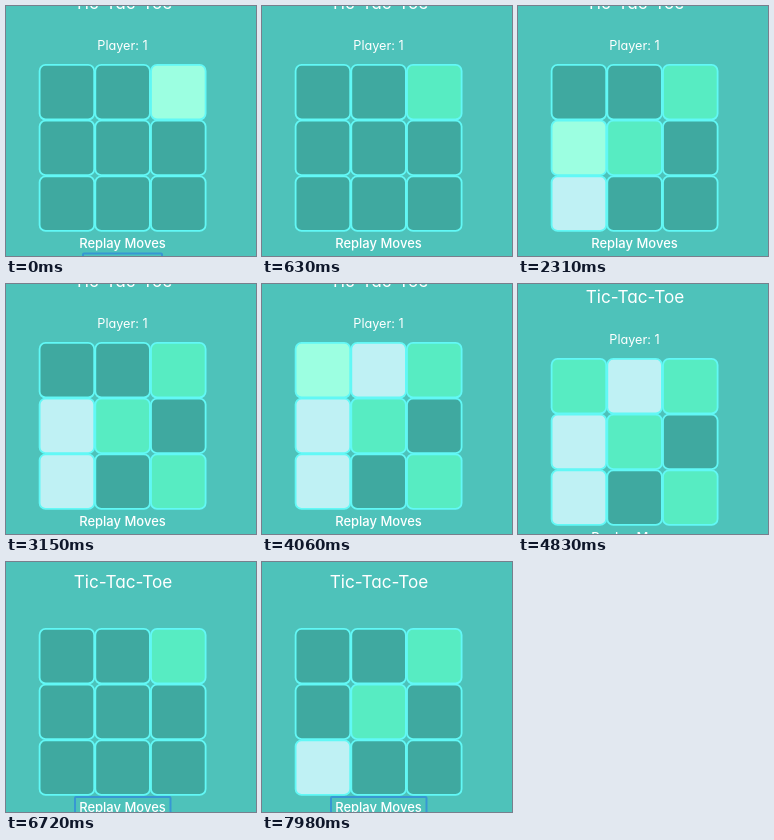
An HTML page that plays this animation: 250 px wide and 250 px high, repeating every 8 s.

```html
<!DOCTYPE html>
<html lang="en">
<head>
<meta charset="utf-8">
<title>Tic-Tac-Toe</title>
<style>
  html, body { margin: 0; width: 100%; height: 100%; overflow: hidden; background: #4ec2ba; }
  svg { display: block; width: 100vw; height: 100vh; }
  text { fill: #fff; text-anchor: middle; font-family: Inter, sans-serif; }
  /* cv11 selects the single-storey "a" */
  #title, #player { font-feature-settings: "cv11"; }
  #title { font-size: 17.2px; }
  #player { font-size: 12.7px; }
  #replay { font-size: 13px; font-weight: 500; }
  .cell { stroke: #62f8f6; stroke-width: 1.8; }
  .focus { fill: none; stroke: #3797d3; stroke-width: 2; }
</style>
</head>
<body>
<svg viewBox="0 0 250 250">
  <text id="title" x="117">Tic-Tac-Toe</text>
  <text id="player" x="116.5">Player: 1</text>
  <g id="board">
    <text id="replay" x="116.5" y="183">Replay Moves</text>
    <rect id="replayFocus" class="focus" x="69" y="168" width="95.5" height="21" rx="1"/>
    <rect id="resetFocus" class="focus" x="77" y="188.5" width="79" height="21" rx="1"/>
  </g>
</svg>
<script>
const DURATION = 8000;
const EMPTY = '#3fa9a0', HOVER = '#9cffe1';
const PLAYERS = ['#57ecc2', '#bff1f4'];

const WIN = 4130, REPLAY = 6090;
// [time, cell], players alternate
const moves = [[490, 2], [1330, 6], [1890, 4], [2380, 3], [3010, 8], [3570, 1], [WIN, 0]];
const replayed = moves.map(([, cell], i) => [6580 + i * 525, cell]);
// [time, cell under the pointer]
const pointer = [[0, 2], [770, 4], [910, 6], [1610, 4], [2170, 3],
                 [2660, 4], [2800, 8], [3290, 4], [3430, 1], [3850, 0]];

const find = id => document.getElementById(id);
const [title, player, board, replayFocus, resetFocus] =
  ['title', 'player', 'board', 'replayFocus', 'resetFocus'].map(find);

const cells = Array.from({ length: 9 }, (_, i) => {
  const rect = document.createElementNS('http://www.w3.org/2000/svg', 'rect');
  const attributes = {
    class: 'cell', x: 33.6 + i % 3 * 55.7, y: -0.1 + Math.floor(i / 3) * 55.7,
    width: 54.6, height: 54.6, rx: 6
  };
  for (const name in attributes) rect.setAttribute(name, attributes[name]);
  board.prepend(rect);
  return rect;
});

function show(element, visible) {
  element.style.visibility = visible ? 'visible' : 'hidden';
}

function layout(t) {
  if (t < WIN) return { titleY: 2.6, playerY: 43.7, boardY: 59 };
  if (t < REPLAY) return { titleY: 18.6, playerY: 59.7, boardY: 75 };
  return { titleY: 26.3, playerY: 59.7, boardY: 67 };
}

function draw(t) {
  const { titleY, playerY, boardY } = layout(t);
  title.setAttribute('y', titleY);
  player.setAttribute('y', playerY);
  board.setAttribute('transform', `translate(0 ${boardY})`);
  show(player, t < REPLAY);
  show(replayFocus, t >= REPLAY);
  show(resetFocus, t < moves[0][0]);

  const colors = Array(9).fill(EMPTY);
  if (t < WIN) colors[pointer.findLast(([time]) => time <= t)[1]] = HOVER;
  (t < REPLAY ? moves : replayed).forEach(([time, cell], i) => {
    if (time <= t) colors[cell] = PLAYERS[i % 2];
  });
  cells.forEach((rect, i) => rect.setAttribute('fill', colors[i]));
}

function tick() {
  draw(performance.now() % DURATION);
  requestAnimationFrame(tick);
}
tick();
</script>
</body>
</html>
```
